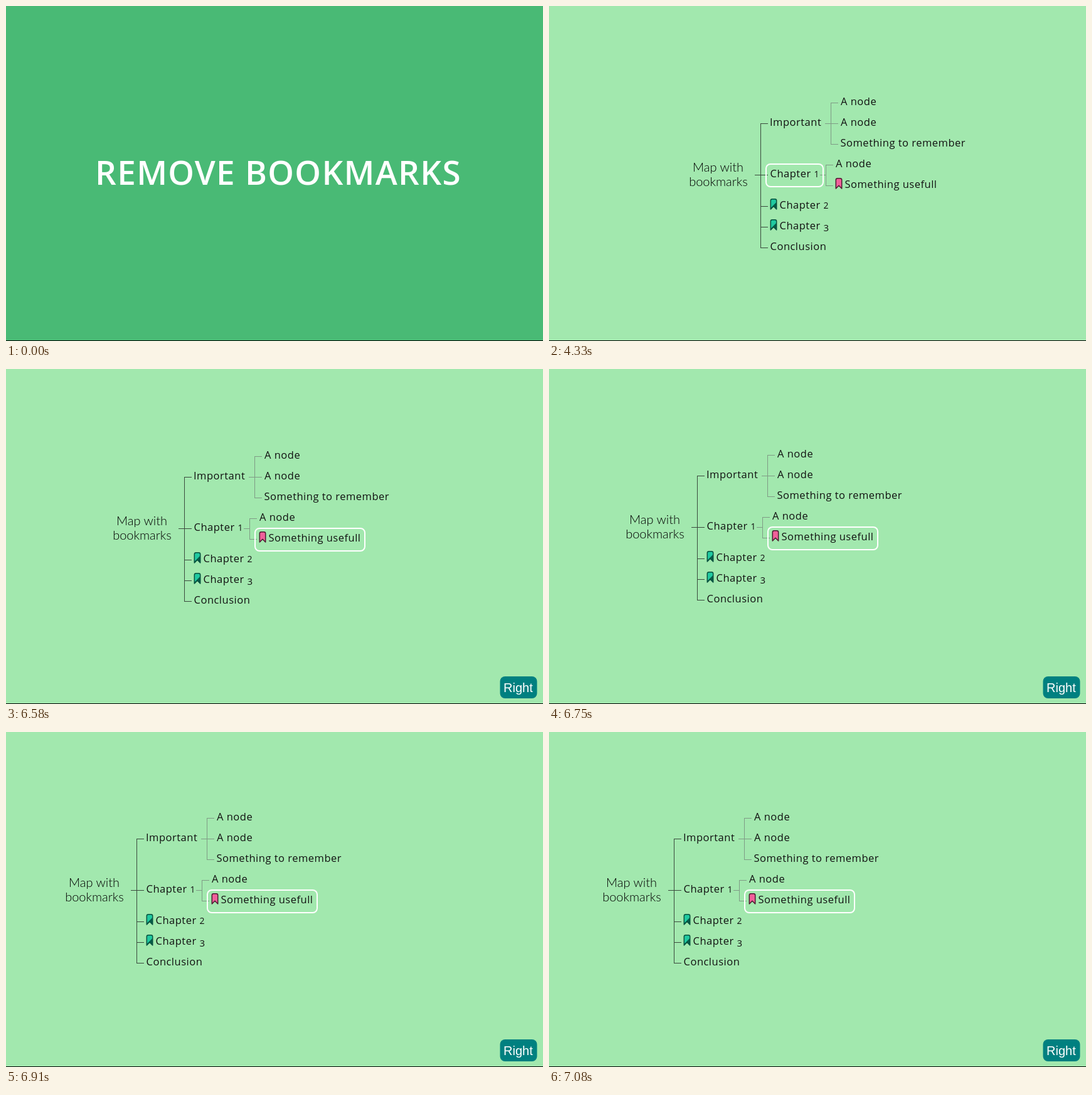
An HTML page for the animation above (8000 ms loop, 856 by 534 pixels).

```html
<!DOCTYPE html>
<html lang="en">
<head>
<meta charset="utf-8">
<title>Remove bookmarks</title>
<style>
html, body { margin: 0; width: 100%; height: 100%; overflow: hidden; background: #49ba75; }
svg { display: block; width: 100%; height: 100%; }
.title { font: 600 53px "Open Sans", sans-serif; letter-spacing: .2px; fill: #fff; text-anchor: middle; }
.caps { letter-spacing: 1.3px; }
.node { font: 400 16.5px "Open Sans", sans-serif; letter-spacing: .5px; fill: #111; }
.root { font: 300 20px Lato, sans-serif; fill: #000; text-anchor: middle; }
.key { font: 20px "Liberation Sans", Arial, sans-serif; fill: #fff; }
.line { fill: none; stroke-width: 1; shape-rendering: crispEdges; }
</style>
</head>
<body>
<svg id="stage" viewBox="0 0 856 534" xmlns="http://www.w3.org/2000/svg">
  <defs>
    <path id="ribbon" d="M.8 3.3Q.8.8 3.3.8H7.7Q10.2.8 10.2 3.3V17L5.5 12.2.8 17Z" stroke-width="1.5" stroke-linejoin="round"/>
  </defs>
  <rect id="back" width="856" height="534"/>
  <text id="heading" class="title caps" x="434" y="285">REMOVE BOOKMARKS</text>
  <g id="command" class="title">
    <text x="434" y="246">Command</text>
    <text x="434" y="317">Toogle the bookmark</text>
  </g>
  <g id="map">
    <g id="lines"></g>
    <text class="root" x="269.5" y="264">Map with</text>
    <text class="root" x="270" y="287">bookmarks</text>
    <g id="nodes"></g>
    <rect id="focus" height="36" rx="7" fill="none" stroke="#fff" stroke-width="2"/>
  </g>
  <g id="key">
    <rect x="787.5" y="490" width="59" height="35" rx="8" fill="#008080"/>
    <text class="key" x="793" y="515">Right</text>
  </g>
  <rect y="533" width="856" height="1"/>
</svg>
<script>
const LOOP = 8000, COMMAND = 500, MAP = 4330, PAN = 6500, PAN_END = 7080;
const $ = id => document.getElementById(id);

// Old-style numerals: 1 and 2 at x-height, 3 hanging below the baseline.
const digit = d => `<tspan font-size="${d < 3 ? 14 : 15}" dy="${d < 3 ? 0 : 3}">${d}</tspan>`;

const node = (x, y, label) =>
  `<text class="node" x="${x}" y="${y}">${label.replace(/\d/, digit)}</text>`;

const mark = (x, y, fill, edge, facet = '') =>
  `<g transform="translate(${x} ${y})"><use href="#ribbon" fill="${fill}" stroke="none"/>${facet}` +
  `<use href="#ribbon" fill="none" stroke="${edge}"/></g>`;

const teal = (x, y) => mark(x, y, '#20c9a0', '#07523f',
  '<path d="M10.2 5.5V17L5.5 12.2.8 17V15Z" fill="#075c48"/>');

const line = (d, color) => `<path class="line" d="${d}" stroke="${color}"/>`;

$('lines').innerHTML =
  line('M349 187.5H337.5V385.5H349M328 269.5H349M337 319.5H349M337 352.5H349', '#3a4a3d') +
  line('M461 154.5H449.5V220.5H461M440 187.5H461M453 253.5H441.5V286.5H453M432 269.5H441', '#7f9b85');

$('nodes').innerHTML = [
  [465, 158, 'A node'], [465, 191, 'A node'], [464.5, 224, 'Something to remember'],
  [352, 191, 'Important'], [352.5, 273, 'Chapter 1'],
  [457, 257, 'A node'], [471.5, 290, 'Something usefull'],
  [367.5, 323, 'Chapter 2'], [367.5, 356, 'Chapter 3'], [352.5, 389, 'Conclusion']
].map(n => node(...n)).join('') +
  mark(456.5, 274, '#f0609a', '#4d1a30') + teal(352.5, 307) + teal(352.5, 340);

const show = (el, on) => el.setAttribute('visibility', on ? 'visible' : 'hidden');

// Distance left when braking at a constant rate until time `end`.
const brake = (t, end) => Math.round((.019 * Math.max(0, end - t)) ** 2);

// The pan advances in seven equal ticks.
function tick(t) {
  const step = (PAN_END - PAN) / 7;
  const k = Math.min(7, Math.floor((t - PAN + 5) / step));
  return PAN + Math.max(0, k) * step;
}

function draw(t) {
  const onMap = t >= MAP, panning = t >= PAN;
  $('back').setAttribute('fill', onMap ? '#a2e8ae' : '#49ba75');
  show($('heading'), t < COMMAND);
  show($('command'), t >= COMMAND && !onMap);
  show($('map'), onMap);
  show($('key'), panning);

  const p = tick(t);
  const dx = panning ? brake(p, 7068) - 138 : 0;
  const dy = panning ? brake(p, 6665) - 17 : 0;
  $('map').setAttribute('transform', `translate(${dx} ${dy})`);

  const [x, y, w] = panning ? [450, 269, 175] : [346, 252, 91];
  const focus = $('focus');
  focus.setAttribute('x', x);
  focus.setAttribute('y', y);
  focus.setAttribute('width', w);
}

const start = performance.now();
function frame() {
  draw((performance.now() - start) % LOOP);
  requestAnimationFrame(frame);
}
draw(0);
requestAnimationFrame(frame);
</script>
</body>
</html>
```
